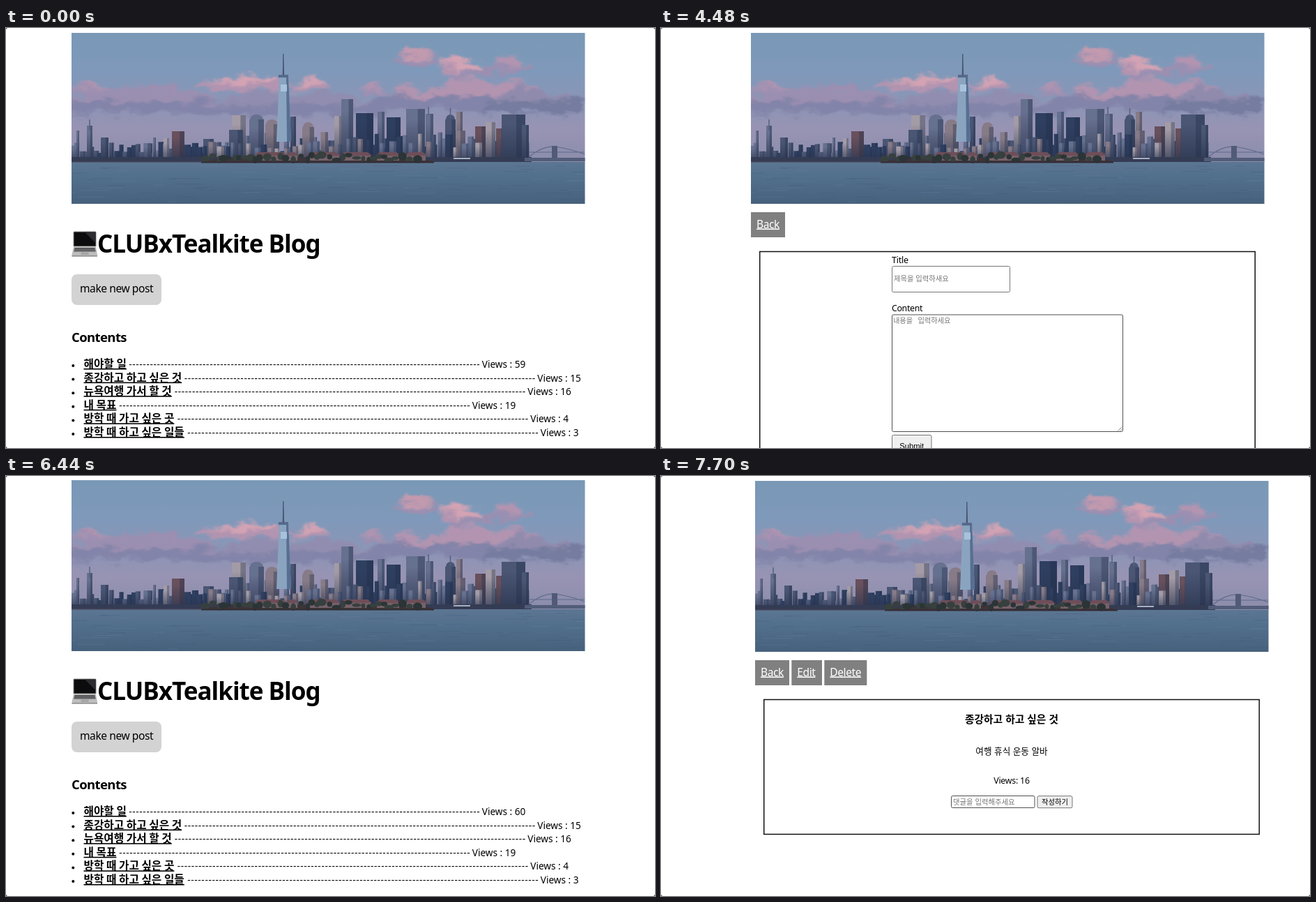
These frames come from a looping animation (931 by 602 pixels, 8000 ms). An HTML page:

```html
<!DOCTYPE html>
<html lang="ko">
<head>
<meta charset="utf-8">
<title>Blog</title>
<style>
  html, body { margin: 0; width: 100%; height: 100%; overflow: hidden; background: #fff; }
  svg { display: block; width: 931px; height: 602px; }
  text { font-family: "Noto Sans", "Noto Sans CJK KR", sans-serif; white-space: pre; }
  .ko { font-family: "Noto Sans CJK KR", "Noto Sans CJK", "Noto Sans", sans-serif; }
  .ui { font-family: "Liberation Sans", Arial, sans-serif; }
  .b { font-weight: 700; }
  .u { text-decoration: underline; text-decoration-thickness: 1.2px; }
  .mid { text-anchor: middle; }
  .hint { fill: #757575; }
</style>
</head>
<body>
<svg id="stage" viewBox="0 0 931 602" xmlns="http://www.w3.org/2000/svg"></svg>
<script>
const LOOP = 8000, TICK = 70;
const GREY = '#808080', SKY = '#90cef8', EDGE = '#767676', EDGE_HOVER = '#4f4f4f';

let seed = 7;
const rnd = () => (seed = (seed * 16807) % 2147483647) / 2147483647;
const between = (a, b) => a + (b - a) * rnd();

const rect = (x, y, w, h, fill, extra = '') =>
  `<rect x="${x}" y="${y}" width="${w}" height="${h}" fill="${fill}" ${extra}/>`;
const ellipse = (x, y, rx, ry, fill, extra = '') =>
  `<ellipse cx="${x}" cy="${y}" rx="${rx}" ry="${ry}" fill="${fill}" ${extra}/>`;
const path = (d, fill, extra = '') => `<path d="${d}" fill="${fill}" ${extra}/>`;
const text = (x, y, str, size, cls = '', gap = 0, extra = '') =>
  `<text x="${x}" y="${y}" font-size="${size}" class="${cls}" letter-spacing="${gap}" ${extra}>${str}</text>`;
const field = (x, y, w, h, fill = '#fff', id = '') =>
  rect(x, y, w, h, fill, `rx="2" stroke="${EDGE}" ${id && `id="${id}"`}`);

// Photo, 736.5 x 245

// A bank of puffs: lit above, shaded below.
function cloud(x, y, w, h, light, shade) {
  const count = Math.ceil(w / h * 3);
  let lit = '', dark = '';
  for (let i = 0; i < count; i++) {
    const u = (i + .5) / count, cx = x + u * w;
    const tall = h * Math.sqrt(Math.sin(u * Math.PI)) * between(.6, 1);
    const rx = h * between(.25, .42);
    lit += ellipse(cx, y + h - tall * .62, rx, tall * .38, light);
    dark += ellipse(cx, y + h * .82, rx * 1.3, h * .2, shade);
  }
  return lit + dark;
}

function clouds() {
  const mauve = '#8384a9', pink = '#d3a3b3', rose = '#b294b0', lilac = '#9b8fb1';
  return '<g filter="url(#soft)">' +
    cloud(-30, 72, 260, 42, lilac, mauve) + cloud(180, 76, 260, 42, '#918db0', mauve) +
    cloud(440, 58, 260, 52, rose, mauve) + cloud(600, 70, 120, 44, '#908bad', '#757c9f') +
    cloud(194, 54, 108, 28, pink, rose) + cloud(318, 60, 46, 20, pink, rose) +
    cloud(466, 20, 58, 24, '#c39aae', lilac) + cloud(536, 24, 28, 34, pink, rose) +
    cloud(550, 38, 50, 26, pink, lilac) + cloud(598, 32, 54, 24, rose, lilac) +
    cloud(415, 72, 34, 16, rose, lilac) + cloud(0, 70, 60, 16, rose, lilac) + '</g>';
}

function block(x, w, top, fill) {
  const h = 184 - top;
  return rect(x, top, w, h, fill) + rect(x, top, w, h, 'url(#dusk)') +
    rect(x + w * .62, top, w * .38, h, '#1f2b46', 'opacity=".35"');
}

function skyline() {
  const tones = ['#66708f', '#4a5674', '#2f3f60', '#a39ba6', '#877b88', '#68505c'];
  // left, width, top, tone
  const towers = [
    [7, 4, 140, 0], [22, 8, 133, 0], [42, 11, 150, 1], [117, 4, 150, 0], [132, 8, 151, 3],
    [144, 18, 141, 5], [189, 15, 152, 1], [230, 20, 118, 3], [226, 20, 139, 1],
    [314, 8, 120, 1], [377, 11, 119, 3], [387, 17, 95, 0], [408, 25, 115, 2],
    [439, 10, 113, 0], [452, 20, 121, 2], [480, 27, 109, 0], [508, 11, 116, 0],
    [552, 9, 113, 4], [546, 19, 140, 4], [579, 15, 134, 5], [594, 14, 128, 3],
    [609, 12, 137, 5], [617, 34, 117, 1], [646, 10, 132, 1]
  ];
  const domes = [[255, 21, 118, 0], [278, 19, 125, 4], [331, 17, 129, 4], [536, 15, 118, 1]];
  let out = '';
  for (let x = 0; x < 652; x += between(4, 8))
    out += block(x, between(5, 10), between(x < 225 ? 156 : 142, 174), tones[Math.floor(rnd() * 3)]);
  for (const [x, w, top, tone] of towers) out += block(x, w, top, tones[tone]);
  for (const [x, w, top, tone] of domes)
    out += ellipse(x + w / 2, top + 6, w / 2 - 1, 7, tones[tone]) + block(x, w, top + 6, tones[tone]);
  for (let x = 180; x < 580; x += between(7, 14))
    out += block(x, between(5, 11), between(x < 330 ? 156 : 142, 166), tones[Math.floor(rnd() * 5)]);
  out += path('M26 124V140M543.5 108V122M512 106V118', 'none', 'stroke="#56617f" stroke-width="1.5"');
  out += path('M294 156L298 62H311L315 156Z', '#8aa4c0') +
    path('M308 62H311L315 156H309Z', '#566f92') + rect(297, 60, 14, 4, '#566b8c') +
    path('M303.2 60L303.8 30L304.6 60Z', '#454f6b', 'stroke="#454f6b" stroke-width=".8"') +
    rect(300, 74, 9, 10, '#a9c2dc');
  return out;
}

function shore() {
  let out = rect(0, 178, 660, 7, '#343c54') +
    path('M656 171H736M656 178Q675 162 693 163Q715 166 736 174', 'none', 'stroke="#606b8b" stroke-width="1.2"') +
    rect(689, 162, 8, 20, '#515a78') + rect(650, 179, 87, 5, '#525d7a') + rect(548, 179, 24, 2, '#aab0c4');
  out += path('M186 186Q190 180 260 179H480Q515 180 520 186Z', '#3d3438');
  for (const [x, w] of [[264, 44], [310, 14], [338, 46], [387, 42], [438, 32], [480, 28]])
    out += rect(x, 175, w, 8, '#75626a') +
      path(`M${x - 2} 176L${x + 4} 171H${x + w - 4}L${x + w + 2} 176Z`, '#6e4e58');
  for (let x = 192; x < 500; x += between(5, 12))
    out += ellipse(x, between(175, 182), between(3, 7), between(2.5, 6), rnd() < .5 ? '#2b3436' : '#37403e');
  return out + rect(0, 184, 190, 1.5, '#454357') + rect(186, 184.5, 334, 2, '#332c34');
}

function water() {
  let out = rect(0, 185, 737, 60, 'url(#sea)');
  for (let i = 0; i < 90; i++)
    out += rect(between(-20, 730), between(188, 244), between(10, 45), .8,
      rnd() < .5 ? '#6583a3' : '#3c587a', 'opacity=".4"');
  return out;
}

const stops = list => list.map(([o, c, a = 1]) =>
  `<stop offset="${o}" stop-color="${c}" stop-opacity="${a}"/>`).join('');
const defs = `<defs>
  <linearGradient id="air" x2="0" y2="1">${stops([[0, '#7998b6'], [.3, '#7f99ba'], [.55, '#8c95b6'], [.75, '#9893b3'], [1, '#8a8dab']])}</linearGradient>
  <linearGradient id="sea" x2="0" y2="1">${stops([[0, '#5c7692'], [.3, '#53708d'], [1, '#46617c']])}</linearGradient>
  <linearGradient id="dusk" x2="0" y2="1">${stops([[.2, '#28324c', 0], [1, '#28324c', .75]])}</linearGradient>
  <filter id="soft" x="-10%" y="-20%" width="120%" height="140%">
    <feGaussianBlur stdDeviation="2.2" result="blur"/>
    <feTurbulence type="fractalNoise" baseFrequency=".035 .06" numOctaves="4" seed="4"/>
    <feDisplacementMap in="blur" scale="24" xChannelSelector="R" yChannelSelector="G"/>
  </filter>
  <clipPath id="crop"><rect width="736.5" height="245"/></clipPath></defs>`;
const photo = '<g id="photo"><g clip-path="url(#crop)">' + rect(0, 0, 737, 186, 'url(#air)') +
  clouds() + skyline() + water() + shore() + '</g></g>';

// Pages

const laptop = rect(96.5, 291.5, 33, 22, '#8a8a8a', 'rx="1.5"') + rect(97.5, 292.5, 31, 20, '#0c0c0e') +
  path('M113 292.5H128.5V308Z', '#2c2c30') +
  path('M97 313.5H129L131 325V327.5H94.5V325Z', '#bdbdbd') +
  path('M98.5 315H127.5L128.6 320.5H97.2Z', '#505052') +
  path('M98 317H128M97.5 319H128.3', 'none', 'stroke="#9a9a9a" stroke-width=".5"') +
  rect(107.5, 321.5, 11, 3.5, '#a4a4a4') + rect(94.5, 326, 36.5, 1.5, '#8f8f8f');

// title, end of title, views
const posts = [
  ['해야할 일', 172.5, 59], ['종강하고 하고 싶은 것', 252, 15], ['뉴욕여행 가서 할 것', 238, 16],
  ['내 목표', 158.5, 19], ['방학 때 가고 싶은 곳', 242, 4], ['방학 때 하고 싶은 일들', 256.5, 3]
];

const home = laptop + text(131, 322, 'CLUBxTealkite Blog', 35, 'b', -1) +
  rect(94, 353, 129, 44, '#d3d3d3', 'rx="8" id="make"') +
  text(106, 379, 'make new post', 15.5, '', -.4) +
  text(94, 450, 'Contents', 18.5, 'b', -.6) +
  posts.map(([name, end, views], i) => {
    const y = 487 + i * 19.6;
    return ellipse(96.3, y - 3, 2, 2, '#000') +
      text(111.5, y, name, 15.7, 'ko b u', 0, 'word-spacing="-.8"') +
      text(end + 3.7, y, '-'.repeat(100), 13.6, '', .665) +
      text(end + 510.3, y, `Views : ${views}`, 13.6, '', 0, `id="views${i}"`);
  }).join('');

const button = (x, w, label, id = '') => rect(x, 264, w, 36, GREY, id && `id="${id}"`) +
  text(x + 8, 286.5, label, 15.5, 'u', -.4, 'fill="#fff"');
const frame = (x, h) => rect(x, 320.5, 710.5, h, 'none', 'stroke="#111" stroke-width="1.5"');

const form = button(129, 49, 'Back', 'back') + frame(141.7, 300.5) +
  text(331, 336.5, 'Title', 12.5, '', -.2) + field(331.5, 341.5, 169, 37) +
  text(334, 363.3, '제목을 입력하새요', 10.3, 'ko hint') +
  text(331, 406, 'Content', 12.3, '', -.3) + field(331.5, 411, 331, 167.5, '#fff', 'area') +
  text(333, 422.5, '내용을 입력하세요', 10.2, 'ko hint', 0, 'word-spacing="4.5"') +
  path('M655.5 577.5L661.5 571.5M659 577.5L661.5 575', 'none', 'stroke="#666" stroke-width=".8"') +
  field(331.5, 583.5, 56.5, 32.5, '#efefef') + text(359.7, 603.3, 'Submit', 11.2, 'ui mid');

const post = button(135, 49, 'Back') + button(187.3, 43.7, 'Edit') + button(234.3, 61, 'Delete') +
  frame(147.7, 193) + text(503, 354, posts[1][0], 14.7, 'ko b mid') +
  text(503, 399, '여행 휴식 운동 알바', 12.6, 'ko mid') +
  text(503, 441, 'Views: 16', 12.3, 'mid', -.2) +
  field(416.5, 458.5, 119.5, 17, '#fff', 'reply') +
  text(419, 471, '댓글을 입력해주세요', 10.35, 'ko hint') +
  field(540, 458.7, 50, 17, '#efefef') + text(565, 471, '작성하기', 10.35, 'ko mid');

const corners = path('M0 0H931V602H0ZM3 0H928Q931 0 931 3V599Q931 602 928 602H3Q0 602 0 599V3Q0 0 3 0Z',
  '#333', 'fill-rule="evenodd"');

document.getElementById('stage').innerHTML = defs + rect(0, 0, 931, 602, '#fff') + photo +
  `<g id="home">${home}</g><g id="form">${form}</g><g id="post">${post}</g>` + corners;

// Motion

const $ = id => document.getElementById(id);
const pages = { home: 94, form: 129, post: 135 };
const formScroll = [[4690, 0], [4760, 4], [4830, 12], [4900, 21], [4970, 24], [5040, 24], [5320, 20], [5390, 20], [5530, 19]];
const homeScroll = [[6370, 0], [6650, 4], [6930, 0]];

function track(keys, t) {
  if (t <= keys[0][0]) return keys[0][1];
  for (let i = 1; i < keys.length; i++) {
    const [t0, a] = keys[i - 1], [t1, b] = keys[i];
    if (t < t1) return a + (b - a) * (t - t0) / (t1 - t0);
  }
  return keys[keys.length - 1][1];
}

function draw(t) {
  const page = t >= 7420 ? 'post' : t >= 2730 && t < 5950 ? 'form' : 'home';
  const scroll = page === 'form' ? track(formScroll, t) : page === 'home' ? track(homeScroll, t) : 0;
  for (const name in pages) {
    $(name).setAttribute('display', name === page ? 'inline' : 'none');
    $(name).setAttribute('transform', `translate(0 ${-scroll})`);
  }
  $('photo').setAttribute('transform', `translate(${pages[page]} ${7 - scroll})`);
  $('make').setAttribute('fill', t >= 2380 && t < 2730 ? SKY : '#d3d3d3');
  $('back').setAttribute('fill', t >= 5530 ? SKY : GREY);
  $('area').setAttribute('stroke', t >= 4480 && t < 5460 ? EDGE_HOVER : EDGE);
  $('reply').setAttribute('stroke', t >= 7700 ? EDGE_HOVER : EDGE);
  $('views0').textContent = `Views : ${t >= 5950 ? 60 : 59}`;
}

let shown = -1;
function loop() {
  const t = Math.floor(performance.now() % LOOP / TICK) * TICK;
  if (t !== shown) draw(shown = t);
  requestAnimationFrame(loop);
}
loop();
</script>
</body>
</html>
```
